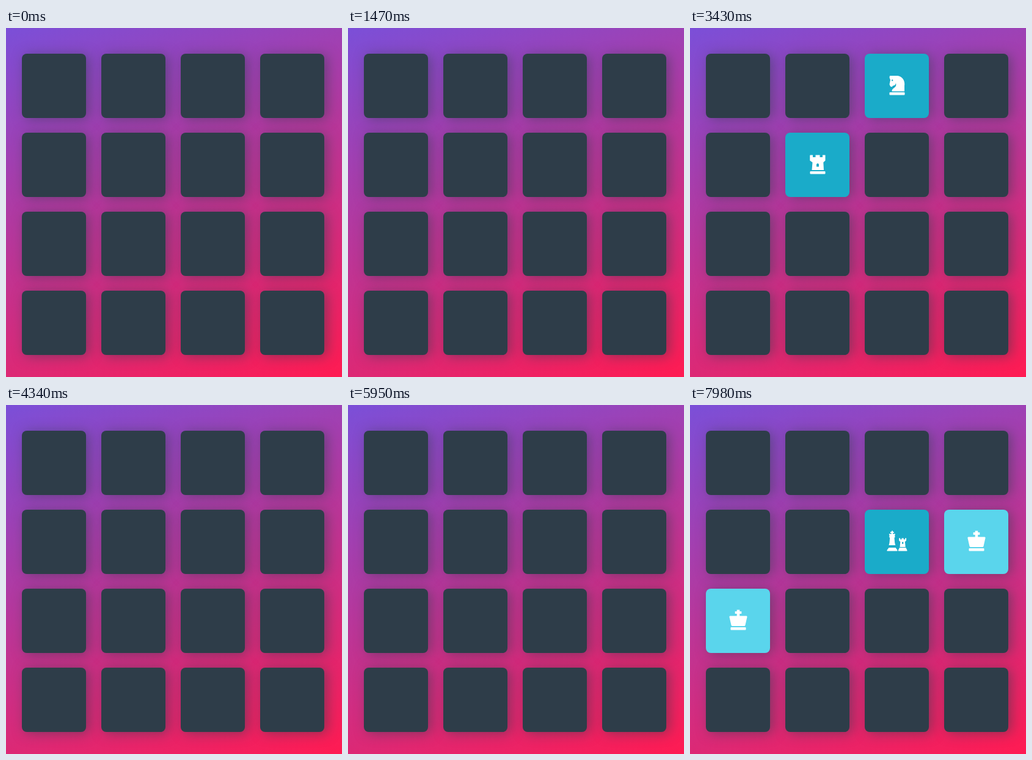
Recreate the animation shown at these times as an HTML page. Size 550x570 px, loop 8000 ms.

```html
<!DOCTYPE html>
<html lang="en">
<head>
<meta charset="utf-8">
<title>Memory cards</title>
<style>
  html, body { margin: 0; width: 100%; height: 100%; overflow: hidden; }
  #deck {
    position: relative; width: 550px; height: 570px; overflow: hidden;
    background: linear-gradient(160deg, #7b4fd8 0%, #ff1b52 100%);
  }
  .card {
    position: absolute; width: 105px; height: 105px; border-radius: 8px;
    background: #2e3d49; box-shadow: 5px 2px 20px rgba(46, 61, 73, .5);
  }
  .card svg { position: absolute; left: 32.5px; top: 32.5px; fill: #fff; fill-rule: evenodd; }
</style>
</head>
<body>
<div id="deck"></div>
<script>
const LOOP = 8000, FLIP = 280;
const CLOSED = [46, 61, 73], OPEN = [26, 171, 201], MATCHED = [90, 213, 236];

// Icon outlines, centred on the card
const bar = 'M-11.5 10h23q1 0 1 1v2.5q0 1-1 1h-23q-1 0-1-1v-2.5q0-1 1-1z';
const icons = {
  knight: bar + 'M-12-17H1C9-16 13.5-8 12-.5V8.5H-8.5C-8.5 4-5 3.5-2.5.5-1.3-1-1.6-3-2-5' +
    'C-3-1.5-5-.7-7-.7L-8.3 1.2-11 .5-12.5-3-11-10-12.5-14z' +
    'M-9-9.6a1.2 1.2 0 1 0 2.4 0a1.2 1.2 0 1 0-2.4 0z',
  rook: bar + 'M-12-16.5h4v3.5h4.5v-3.5h7v3.5h4.5v-3.5h4.5v9l-3.2 3L10 8H-9.5L-8.5-4.5-12.7-7.5v-8.5z' +
    'M-2 2.5h4v-4q-2-3-4 0z',
  king: bar + 'M-2.3-18.5h4.6v2.4h3v4.2h-3v3.4h11q1.5 0 1.2 1.7L11.5 6.5q-.4 1.5-2 1.5h-19' +
    'q-1.6 0-2-1.5L-14.5-6.8q-.3-1.7 1.2-1.7h11v-3.4h-3v-4.2h3z',
  pair: 'M-9-18.5h2v1.4h1.7v2H-7v1.6h4l-1 3.8 1 1-1.5 1.5.7 8.2 1 4H-13.5l1-4 .7-8.2-1.5-1.5 1-1' +
    '-1-3.8h4v-1.6H-11v-2h2z' +
    'M-13.5 9h11l3 4v1.5h-17V13z' +
    'M3-6.5h2.2v2h2.3v-2h3.2v2H13v-2h2.2l-.3 4.3-2 1.5.8 8.7H4.5l.8-8.7-2-1.5z' +
    'M8-.2h2.3v3H8z' +
    'M4 9h10.4l2 4v1.5H2V13z'
};

// Card slot, icon, and the times it opens, closes and matches
const moves = [
  { slot: 5, icon: 'rook', open: 1750, close: 3710 },
  { slot: 2, icon: 'knight', open: 2240, close: 3710 },
  { slot: 8, icon: 'king', open: 6020, match: 6650 },
  { slot: 7, icon: 'king', open: 6370, match: 6650 },
  { slot: 6, icon: 'pair', open: 7420 }
];

const deck = document.getElementById('deck');
const cards = Array.from({ length: 16 }, (_, i) => {
  const card = document.createElement('div');
  card.className = 'card';
  card.style.left = 26 + 130 * (i % 4) + 'px';
  card.style.top = 42 + 129 * Math.floor(i / 4) + 'px';
  deck.append(card);
  return card;
});

for (const { slot, icon } of moves) {
  cards[slot].innerHTML =
    `<svg width="40" height="40" viewBox="-20 -20 40 40"><path d="${icons[icon]}"/></svg>`;
}

const ease = (t, start, span) => {
  const p = Math.min(1, Math.max(0, (t - start) / span));
  return p * p * (3 - 2 * p);
};
const mix = (a, b, p) => `rgb(${a.map((v, i) => Math.round(v + (b[i] - v) * p))})`;

function draw(t) {
  for (const { slot, open, close = Infinity, match = Infinity } of moves) {
    const turn = ease(t, open, FLIP) - ease(t, close, FLIP);
    const card = cards[slot], faceUp = turn > .5;
    card.style.transform = `scaleX(${Math.abs(Math.cos(turn * Math.PI))})`;
    card.style.backgroundColor = faceUp ? mix(OPEN, MATCHED, ease(t, match, 140)) : mix(CLOSED, CLOSED, 0);
    card.firstChild.style.visibility = faceUp ? 'visible' : 'hidden';
  }
}

const began = performance.now();
(function frame() {
  draw((performance.now() - began) % LOOP);
  requestAnimationFrame(frame);
})();
</script>
</body>
</html>
```
